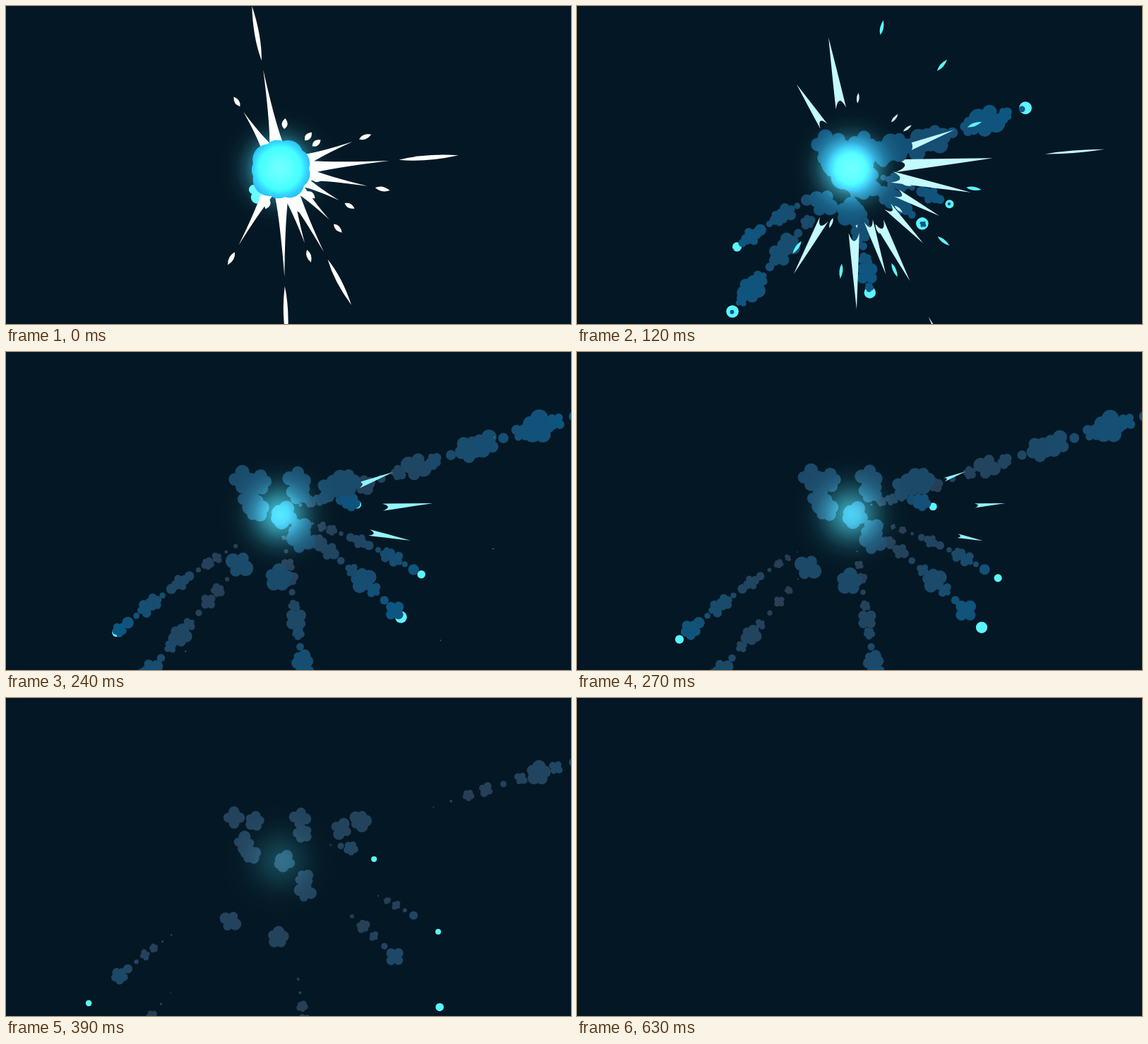
Recreate the animation shown at these times as an HTML page with a canvas. Size 800 by 450 pixels, loop 0.66 s.

```html
<!DOCTYPE html>
<html lang="en">
<head>
<meta charset="utf-8">
<title>Blue burst</title>
<style>
html, body { margin: 0; width: 100%; height: 100%; overflow: hidden; background: #041724; }
canvas { display: block; }
</style>
</head>
<body>
<canvas id="stage" width="800" height="450"></canvas>
<script>
const ctx = document.getElementById('stage').getContext('2d');
const LOOP = 660, STEP = 30, SPAN = 600;
const CX = 389, CY = 231;
const CYAN = '#5cf5ff';
const FRESH = [9, 90, 136], OLD = [45, 58, 76], HOT = [18, 125, 185];

const clamp = v => Math.max(0, Math.min(1, v));
const mix = (a, b, k) => a.map((v, i) => v + (b[i] - v) * k);
const rgb = c => `rgb(${c.map(Math.round).join()})`;
const easeOut = (u, power) => 1 - (1 - clamp(u)) ** power;
const random = n => { const v = Math.sin(n * 12.9898) * 43758.5453; return v - Math.floor(v); };

// A point at a distance along a direction from the centre, shifted sideways.
function polar(degrees, distance, side = 0) {
  const a = degrees * Math.PI / 180, c = Math.cos(a), s = Math.sin(a);
  return [CX + c * distance - s * side, CY + s * distance + c * side];
}

// A head flies out on a bent path and leaves puffs at even distances.
function makeTrail(angle, reach, bend, power, size, lead = 0) {
  const at = s => polar(angle, lead + (reach - lead) * s, 2 * s * (1 - s) * bend);
  const puffs = [];
  const gap = size * 1.3 / (reach - lead), last = easeOut(235 / SPAN, power);
  for (let s = easeOut(20 / SPAN, power), i = 0; s < last; s += gap, i++) {
    const born = SPAN * (1 - (1 - s) ** (1 / power)) - 8;
    const r = size * (.8 + .45 * Math.cos(1.8 * (i - 2.5)));
    puffs.push({ at: at(s), r, born, dies: 250 + 1.55 * born });
  }
  return { at, power, head: Math.min(9, size * .55), puffs };
}
const trails = [
  makeTrail(-17.4, 724, -20, 2, 20),
  makeTrail(.4, 138, -47, 3, 11),
  makeTrail(24.3, 248, -25, 4, 11),
  makeTrail(43.7, 348, -29, 2, 16),
  makeTrail(81.6, 490, 0, 2, 15),
  makeTrail(130, 409, 0, 4, 16, 52),
  makeTrail(143.3, 351, 18, 3, 12, 48)
];

// Drifting smoke: angle and final distance. Near clouds get a smaller twin.
const clouds = [
  [-137, 93], [-153, 60], [-66, 69], [51, 57], [0, 6], [-28, 100], [-27, 130], [130, 114], [92, 111]
].flatMap(([angle, distance], i) => {
  const cloud = { angle, distance, r: 21 };
  const twin = { angle: angle + (i % 2 ? -14 : 14), distance: distance * .75, r: 19 };
  return distance < 100 ? [cloud, twin] : [cloud];
});

// Rays: angle and length.
const rays = [
  [-123, 97], [-100, 143], [-21, 109], [-4.5, 154], [11, 125], [28, 94],
  [46, 99], [62.5, 132], [72, 110], [88, 152], [119, 123]
];

function disc(x, y, r, color) {
  if (r <= 0) return;
  ctx.fillStyle = color;
  ctx.beginPath();
  ctx.arc(x, y, r, 0, 7);
  ctx.fill();
}

// Large puffs are clusters of round lobes, small ones plain discs.
function puff([x, y], full, scale, seed, color, lobes = 4 + seed % 2) {
  const r = full * scale;
  if (full < 9) return disc(x, y, r, color);
  disc(x, y, r * .55, color);
  for (let j = 0; j < lobes; j++) {
    const angle = seed * 2.4 + j * 2 * Math.PI / lobes;
    const lobe = r * (.48 + .08 * Math.sin(seed * 7 + j * 3));
    disc(x + Math.cos(angle) * r * .52, y + Math.sin(angle) * r * .52, lobe, color);
  }
}

function aim(degrees, draw) {
  ctx.save();
  ctx.translate(CX, CY);
  ctx.rotate(degrees * Math.PI / 180);
  ctx.beginPath();
  draw();
  ctx.fill();
  ctx.restore();
}

function lens(angle, a, b, w, peak = .45) {
  const m = a + (b - a) * peak;
  aim(angle, () => {
    ctx.moveTo(a, 0);
    ctx.quadraticCurveTo(m, w, b, 0);
    ctx.quadraticCurveTo(m, -w, a, 0);
  });
}

function drawTrails(t) {
  for (const { at, power, head } of trails) {
    disc(...at(easeOut(t / SPAN, power)), head * (1 - (t / 510) ** 4), CYAN);
  }
  trails.forEach(({ puffs }, k) => puffs.forEach(({ at, r, born, dies }, i) => {
    if (t <= born || t >= dies) return;
    const age = (t - born) / (dies - born);
    const scale = Math.sqrt(clamp((t - born) / 35)) * (1 - (t / dies) ** 4);
    puff(at, r, scale, i + k * 3, rgb(mix(FRESH, OLD, age ** .8)));
  }));
}

// Tapered ray whose notched base catches up with its tip.
function drawRay(t, angle, length) {
  const life = Math.abs(angle) < 22 ? 310 : 210, u = t / life;
  if (u >= 1) return;
  const b = length + 70 * (1 - Math.exp(-t / 110));
  const a = 38 + (b - 38) * u * u;
  const w = (4 + length * .035) * (1 - u ** 3);
  const notch = Math.min(w * 3, (b - a) * .3) * clamp(t / 60);
  const neck = a + (b - a) * .35, waist = w * (.35 + .35 * clamp(t / 120));
  aim(angle, () => {
    ctx.moveTo(a, -w);
    ctx.quadraticCurveTo(neck, -waist, b, 0);
    ctx.quadraticCurveTo(neck, waist, a, w);
    ctx.quadraticCurveTo(a + notch, 0, a, -w);
  });
}

function drop(t, angle, a, length, w, life) {
  const fade = 1 - (t / life) ** 2;
  if (fade <= 0) return;
  const start = a * (1 + .0053 * t);
  lens(angle, start, start + length, w * fade);
}

function drawRays(t) {
  ctx.fillStyle = rgb([255 - Math.min(110, t * .5), 255 - t * .04, 255]);
  for (const [angle, length] of rays) {
    drawRay(t, angle, length);
    const long = length > 130;
    drop(t, angle, length * 1.09, length * (long ? .55 : .17), 6.5, long ? 175 : 110);
  }
  for (let i = 0; i < 9; i++) {
    drop(t, -85 + i * 24 + 12 * random(i), 42 + 20 * random(i + 20), 15, 8, 165);
  }
}

function drawSparks(t) {
  const size = 1 - t / 260;
  if (t === 0 || size <= 0) return;
  ctx.fillStyle = CYAN;
  for (let i = 0; i < 8; i++) {
    const r = (205 - 10 * i) * (t / 120) ** .8;
    lens(-78 + 29 * i, r - 20 * size, r + 20 * size, 9 * size);
  }
}

function drawClouds(t) {
  if (t >= SPAN) return;
  const color = rgb(mix(mix(FRESH, OLD, (t / SPAN) ** .8), HOT, clamp(1 - t / 90)));
  const spread = .2 + .8 * easeOut(t / 480, 2);
  const scale = (.7 + .3 * clamp(t / 60)) * (1 - (t / SPAN) ** 3.1);
  puff([CX, CY], 43, 1 - (t / 240) ** 2, 1, color, 9);
  clouds.forEach(({ angle, distance, r }, i) =>
    puff(polar(angle, distance * spread), r, scale, i, color));
}

// Additive light, so that smoke near the centre turns bright blue.
function drawGlow(t) {
  const power = clamp((450 - t) / 320);
  if (!power) return;
  const glow = ctx.createRadialGradient(388, 230, 0, 388, 230, 100);
  for (let s = 0; s <= 1; s += .125) {
    glow.addColorStop(s, `rgba(92,245,255,${power * Math.exp(-7 * s * s) * (1 - s ** 4)})`);
  }
  ctx.globalCompositeOperation = 'lighter';
  ctx.fillStyle = glow;
  ctx.fillRect(288, 130, 200, 200);
  ctx.globalCompositeOperation = 'source-over';
}

function frame() {
  const t = Math.floor(performance.now() % LOOP / STEP) * STEP;
  ctx.fillStyle = '#041724';
  ctx.fillRect(0, 0, 800, 450);
  drawTrails(t);
  drawSparks(t);
  drawRays(t);
  drawClouds(t);
  drawGlow(t);
  requestAnimationFrame(frame);
}
frame();
</script>
</body>
</html>
```
